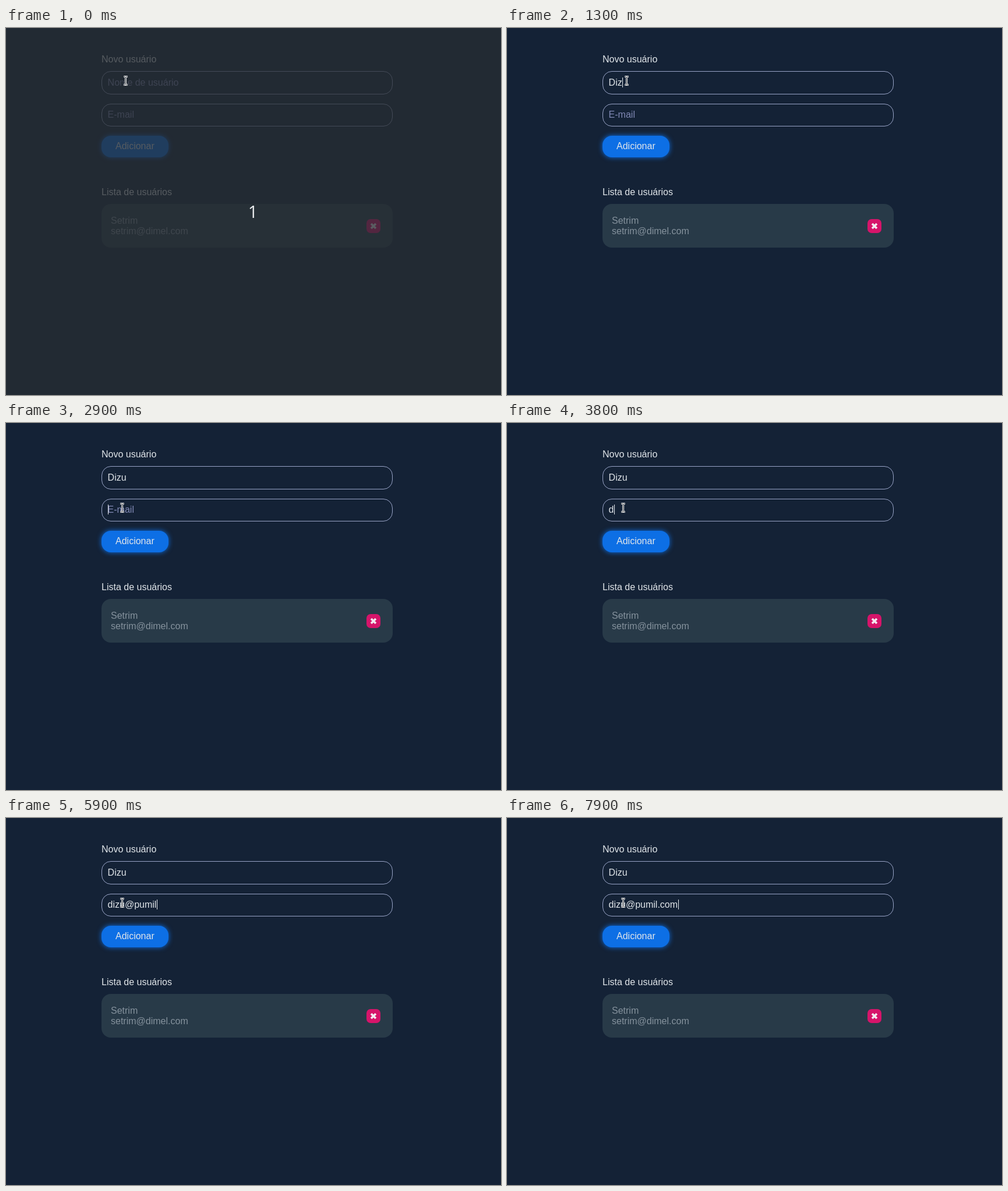
Write an HTML page that moves like this. It is 850 by 630 pixels and loops after 8000 ms.

```html
<!DOCTYPE html>
<html lang="pt-BR">
<head>
<meta charset="utf-8">
<style>
  html, body { margin: 0; width: 100%; height: 100%; overflow: hidden; background: #142236; }
  svg { display: block; }
  text { font: 16px "Liberation Sans", Arial, sans-serif; fill: #e1e6ea; }
  .field { fill: none; stroke: #98a3c6; }
  .hint { fill: #8189b5; }
  .muted { fill: #85929d; }
  .glow { fill: #0d6fe5; filter: drop-shadow(0 0 4px #0d6fe5); }
  #count { font: 29px "Open Sans", "Noto Sans", sans-serif; fill: #eef0f2; text-anchor: middle; }
</style>
</head>
<body>
<svg width="850" height="630" viewBox="0 0 850 630">
  <rect width="850" height="630" fill="#142236"/>

  <text x="164" y="59">Novo usuário</text>
  <rect class="field" x="164.5" y="74.5" width="499" height="39" rx="15.5"/>
  <text id="name" x="174.6" y="99"></text>
  <rect class="field" x="164.5" y="130.5" width="499" height="38" rx="15.5"/>
  <text id="mail" x="174.6" y="154"></text>

  <rect class="glow" x="164" y="185" width="115" height="37" rx="16"/>
  <text x="188" y="208">Adicionar</text>

  <text x="164" y="287">Lista de usuários</text>
  <rect x="164" y="302" width="500" height="75" rx="16" fill="#283a48"/>
  <text class="muted" x="180" y="336">Setrim</text>
  <text class="muted" x="180" y="354">setrim@dimel.com</text>
  <rect x="619" y="328" width="24" height="24" rx="7" fill="#d6146a"/>
  <path d="M627 336l8 8m0-8l-8 8" stroke="#f3eaf0" stroke-width="3.6"/>

  <rect id="caret" width="1" height="17" fill="#e8ecf0"/>

  <g id="veil">
    <rect width="850" height="630" fill="#272d32" fill-opacity=".75"/>
    <text id="count" x="424" y="326">1</text>
  </g>

  <g id="pointer" fill="none">
    <path id="beam" d="M-3-7h2l1 1 1-1h2M-3 7h2l1-1 1 1h2M0-6V6" stroke="#fff" stroke-width="3"/>
    <use href="#beam"/>
    <path d="M-3-7h2l1 1 1-1h2M-3 7h2l1-1 1 1h2M0-6V6" stroke="#10161e" stroke-width="1"/>
  </g>
</svg>
<script>
  const LOOP = 8000, TEXT_X = 174.6;
  const NAME = "Dizu", MAIL = "dizu@pumil";
  const el = id => document.getElementById(id);
  const name = el("name"), mail = el("mail"), caret = el("caret");

  // [start ms, value]
  const nameKeys = [[0, ""], [1000, NAME.slice(0, 1)], [1100, NAME.slice(0, 2)],
    [1300, NAME.slice(0, 3)], [1500, NAME]];
  const mailKeys = [[0, ""], ...[[3800, 1], [4000, 3], [4500, 4], [4600, 5], [5000, 6],
    [5100, 8], [5300, 9], [5900, 10]].map(([t, n]) => [t, MAIL.slice(0, n)]),
    [6200, MAIL + ".c"], [6400, MAIL + ".cm"], [7300, MAIL + ".c"], [7900, MAIL + ".com"]];
  const caretKeys = [[0, false], [300, true], [900, false], [1000, true], [2000, false],
    [2600, true], [2700, false], [2900, true]];
  const pointerKeys = [[0, [205.5, 90.5]], [2700, [216.5, 112.5]], [2800, [203.5, 138.5]],
    [2900, [199.5, 145.5]]];

  const at = (keys, t) => keys.findLast(k => k[0] <= t)[1];
  const show = (node, on) => node.setAttribute("visibility", on ? "visible" : "hidden");

  function fill(node, value, hint) {
    const text = value || hint;
    if (node.textContent !== text) node.textContent = text;
    node.setAttribute("class", value ? "" : "hint");
  }

  function draw(t) {
    const user = at(nameKeys, t), address = at(mailKeys, t);
    fill(name, user, "Nome de usuário");
    fill(mail, address, "E-mail");

    const onMail = t >= 2900;
    const value = onMail ? address : user;
    const width = value ? (onMail ? mail : name).getComputedTextLength() : 0;
    caret.setAttribute("x", Math.ceil(TEXT_X + width));
    caret.setAttribute("y", onMail ? 140 : 85);
    show(caret, at(caretKeys, t));

    show(el("veil"), t < 300);
    el("pointer").setAttribute("transform", `translate(${at(pointerKeys, t)})`);
  }

  const start = performance.now();
  function tick() {
    draw((performance.now() - start) % LOOP);
    requestAnimationFrame(tick);
  }
  tick();
</script>
</body>
</html>
```
